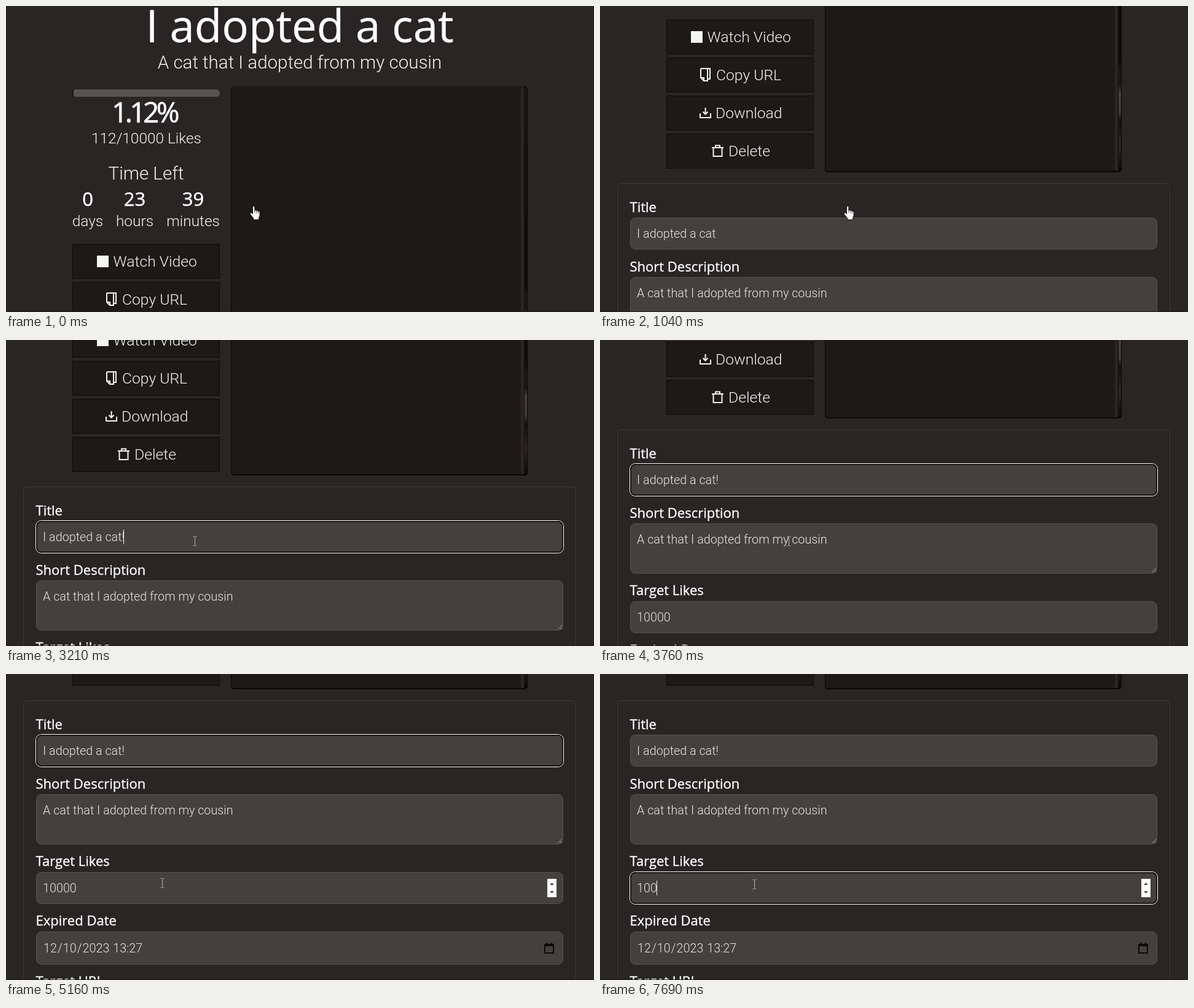
An HTML page that plays this animation: 957x499 px, repeating every 8 s.

```html
<!DOCTYPE html>
<html lang="en">
<head>
<meta charset="utf-8">
<title>Edit post</title>
<style>
html, body { margin: 0; width: 100%; height: 100%; overflow: hidden; background: #292524; }
svg { display: block; position: absolute; left: 0; top: 0; }
text { font: 300 19.75px Roboto, sans-serif; fill: #f5f5f4; white-space: pre; }
.mid { text-anchor: middle; }
.big { font-size: 29.5px; }
.med { font-size: 24.4px; }
.cap { font-size: 24.7px; }
.head, .pct, .num, .label { font: 400 22px "Open Sans", sans-serif; fill: #fff; stroke: #fff; stroke-width: .35px; }
.head { font-size: 72.5px; }
.pct { font-size: 46px; letter-spacing: -.1em; stroke-width: .7px; }
.num { font-size: 31px; stroke-width: .5px; }
.val { fill: #e7e5e4; }
.btn { fill: #1c1917; stroke: #0c0a09; }
.box { fill: #44403c; stroke: #57534e; }
.icon { fill: none; stroke: #f5f5f4; stroke-width: 2; }

.step { animation: 8s step-end infinite; }
#page { animation-name: scroll; }
#titleRing { animation-name: titleRing; }
#bang { animation-name: bang; }
#likesRing { animation-name: likesRing; }
#spin { animation-name: spin; }
#d4 { animation-name: d4; }
#d5 { animation-name: d5; }
#caret { animation-name: caret; }
#hand { animation-name: hand; }
#beam { animation-name: beam; }

@keyframes scroll {
  0% { transform: translateY(0); }
  1.5% { transform: translateY(-15px); }
  3.125% { transform: translateY(-24px); }
  7.75% { transform: translateY(-75px); }
  9.25% { transform: translateY(-165px); }
  11.125% { transform: translateY(-270px); }
  13% { transform: translateY(-366px); }
  14.875% { transform: translateY(-416px); }
  45.5% { transform: translateY(-452px); }
  47% { transform: translateY(-509px); }
  48.75% { transform: translateY(-514px); }
  52.125% { transform: translateY(-555px); }
  53.625% { transform: translateY(-609px); }
  55.125%, 100% { transform: translateY(-612px); }
}
@keyframes titleRing { 0% { opacity: 0; } 24.75% { opacity: 1; } 69.75%, 100% { opacity: 0; } }
@keyframes likesRing { 0% { opacity: 0; } 69.75%, 100% { opacity: 1; } }
@keyframes spin { 0% { opacity: 0; } 58.5%, 100% { opacity: 1; } }
@keyframes bang { 0% { visibility: hidden; } 40.125%, 100% { visibility: visible; } }
@keyframes d5 { 0% { visibility: visible; } 78.5%, 100% { visibility: hidden; } }
@keyframes d4 { 0% { visibility: visible; } 82%, 100% { visibility: hidden; } }
@keyframes caret {
  0% { opacity: 0; transform: translate(187px, 725px); }
  24.75% { opacity: 1; }
  32% { opacity: 0; }
  38.625% { opacity: 1; }
  40.125% { opacity: 1; transform: translate(191px, 725px); }
  47% { opacity: 0; }
  53.625% { opacity: 1; }
  60% { opacity: 0; }
  66% { opacity: 1; }
  69.75% { opacity: 1; transform: translate(114px, 949px); }
  77% { opacity: 0; }
  78.5% { opacity: 1; transform: translate(103px, 949px); }
  82% { opacity: 0; }
  83.5% { opacity: 1; transform: translate(92px, 949px); }
  88.75% { opacity: 0; }
  96.125%, 100% { opacity: 1; transform: translate(92px, 949px); }
}
@keyframes hand { 0% { opacity: 1; } 19.875%, 100% { opacity: 0; } }
@keyframes beam {
  0% { opacity: 0; transform: translate(380px, 331px); }
  19.875% { opacity: 1; transform: translate(376px, 332px); }
  21.375% { opacity: 1; transform: translate(325px, 328px); }
  22.875% { opacity: 1; transform: translate(307px, 327px); }
  58.5% { opacity: 1; transform: translate(303px, 328px); }
  60% { opacity: 1; transform: translate(290px, 331px); }
  61.5% { opacity: 1; transform: translate(275px, 335px); }
  63% { opacity: 1; transform: translate(262px, 338px); }
  64.5% { opacity: 1; transform: translate(254px, 340px); }
  66% { opacity: 1; transform: translate(251px, 341px); }
  67.875%, 100% { opacity: 1; transform: translate(251px, 342px); }
}
</style>
</head>
<body>
<svg width="957" height="499" viewBox="0 0 957 499">
  <defs>
    <linearGradient id="peek" x1="0" y1="0" x2="0" y2="1">
      <stop offset="0" stop-color="#1a1715"/>
      <stop offset=".5" stop-color="#0f0d0c"/>
      <stop offset=".64" stop-color="#0f0c0b"/>
      <stop offset=".68" stop-color="#241a18"/>
      <stop offset=".72" stop-color="#1c1513"/>
      <stop offset=".75" stop-color="#4a3f39"/>
      <stop offset=".81" stop-color="#453a34"/>
      <stop offset=".84" stop-color="#15100e"/>
      <stop offset=".92" stop-color="#33251f"/>
      <stop offset="1" stop-color="#0f0b0a"/>
    </linearGradient>
    <g id="ring" fill="none">
      <rect x="48.5" y="-.5" width="859" height="53" rx="9" stroke="#fff"/>
      <rect x="50" y="1" width="856" height="50" rx="7.5" stroke="#151312" stroke-width="2"/>
    </g>
  </defs>

  <g id="page" class="step">
    <text class="head mid" x="478" y="59">I adopted a cat</text>
    <text class="big mid" x="478" y="102">A cat that I adopted from my cousin</text>

    <rect x="108" y="136" width="240" height="12" rx="6" fill="#57534e"/>
    <path d="M110 136h-1a1 1 0 0 0-1 1v10a1 1 0 0 0 1 1h1z" fill="#1c1917"/>
    <text class="pct mid" x="225" y="190">1.12%</text>
    <text class="med mid" x="228.5" y="224">112/10000 Likes</text>
    <text class="big mid" x="228" y="283">Time Left</text>
    <text class="num mid" x="133" y="326">0</text>
    <text class="num mid" x="209.5" y="326">23</text>
    <text class="num mid" x="304.5" y="326">39</text>
    <text class="med mid" x="133" y="359">days</text>
    <text class="med mid" x="209.5" y="359">hours</text>
    <text class="med mid" x="304.5" y="359">minutes</text>

    <g class="btn">
      <rect x="108.5" y="388.5" width="239" height="56"/>
      <rect x="108.5" y="450.5" width="239" height="56"/>
      <rect x="108.5" y="512.5" width="239" height="56"/>
      <rect x="108.5" y="574.5" width="239" height="56"/>
    </g>
    <rect x="148" y="407" width="19" height="19" fill="#f5f5f4"/>
    <g class="icon">
      <path d="M164 468h15v17h-4M175 468v20h-6l-5-5v-15M169 488v-5h-5"/>
      <path d="M163 541v7h17v-7M171.5 532v10M167.5 538.5l4 4 4-4"/>
      <path d="M182 597h19M184.5 597v14h14v-14M188 597v-3.5h7v3.5"/>
    </g>
    <text class="cap" x="174.5" y="425">Watch Video</text>
    <text class="cap" x="189" y="487">Copy URL</text>
    <text class="cap" x="188" y="549">Download</text>
    <text class="cap" x="209" y="611">Delete</text>

    <rect x="366" y="131" width="483" height="506" rx="5" fill="#080706"/>
    <rect x="367" y="131" width="478" height="504" rx="4" fill="#1c1917"/>
    <rect x="838" y="133" width="5" height="502" fill="#292524"/>
    <rect x="843" y="133" width="1" height="502" fill="#0c0a09"/>
    <rect x="844" y="133" width="4" height="500" fill="url(#peek)"/>

    <rect x="27.5" y="655.5" width="901" height="700" rx="5" fill="none" stroke="#211e1d"/>
    <rect x="28.5" y="655.5" width="899" height="700" rx="4" fill="#292524" stroke="#403c39"/>

    <text class="label" x="48.5" y="702">Title</text>
    <rect class="box" x="49.5" y="711.5" width="857" height="51" rx="8"/>
    <use id="titleRing" class="step" href="#ring" y="711"/>
    <text class="val" x="60" y="744">I adopted a cat<tspan id="bang" class="step">!</tspan></text>

    <text class="label" x="48.5" y="799">Short Description</text>
    <rect class="box" x="49.5" y="808.5" width="857" height="81" rx="8"/>
    <text class="val" x="60" y="841">A cat that I adopted from my cousin</text>
    <path d="M898 888l7-7M902 888l3-3" stroke="#a8a29e" fill="none"/>

    <text class="label" x="48.5" y="925">Target Likes</text>
    <rect class="box" x="49.5" y="935.5" width="857" height="51" rx="8"/>
    <use id="likesRing" class="step" href="#ring" y="935"/>
    <text class="val" x="60" y="968">100<tspan id="d4" class="step">0</tspan><tspan id="d5" class="step">0</tspan></text>
    <g id="spin" class="step">
      <rect x="881" y="946" width="15" height="30" fill="#fff"/>
      <path d="M885 956l3.5-4 3.5 4zM885 966l3.5 4 3.5-4z" fill="#505050"/>
    </g>

    <text class="label" x="48.5" y="1022">Expired Date</text>
    <rect class="box" x="49.5" y="1032.5" width="857" height="53" rx="8"/>
    <text class="val" x="61" y="1066">12<tspan dx="1">/</tspan><tspan dx="1">10</tspan><tspan dx="1">/</tspan><tspan dx="1">2023 </tspan><tspan dx="1">13:27</tspan></text>
    <path d="M877 1053h14v14h-14z" fill="none" stroke="#0c0a09" stroke-width="2"/>
    <path d="M876 1052h16v4h-16zM879 1050h2v3h-2zM887 1050h2v3h-2z" fill="#0c0a09"/>

    <text class="label" x="48.5" y="1121">Target URL</text>
    <rect id="caret" class="step" width="1" height="24" fill="#f5f5f4"/>
  </g>

  <rect y="498" width="957" height="1" fill="#1f1c1b"/>

  <g id="hand" class="step">
    <g transform="translate(396.5 326)" stroke-width=".8">
      <path fill="#fff" stroke="#000" stroke-linejoin="round"
        d="M5 2C5 0 8.3 0 8.3 2V7.5C9 6.600 11 6.900 11.2 8.2 12 7.3 13.7 7.7 14 9 15 8.4 16.5 9 16.5 10.5V15C16.5 17 15 18.5 15 20V22.5H6.5V20.5C4.5 18 2.5 15.5 1 13.3 0 11.5 2 10.3 3.3 11.6L5 13.3Z"/>
      <path d="M8.3 7.5v4M11.2 8.5v3.5M14 9.5v3" fill="none" stroke="#222"/>
    </g>
  </g>
  <g id="beam" class="step">
    <path d="M-2.5-6.5h2l1 1 1-1h2M.5-5.5v13M-2.5 8.5h2l1-1 1 1h2" fill="none" stroke="#b8b4b0"/>
  </g>
</svg>
</body>
</html>
```
